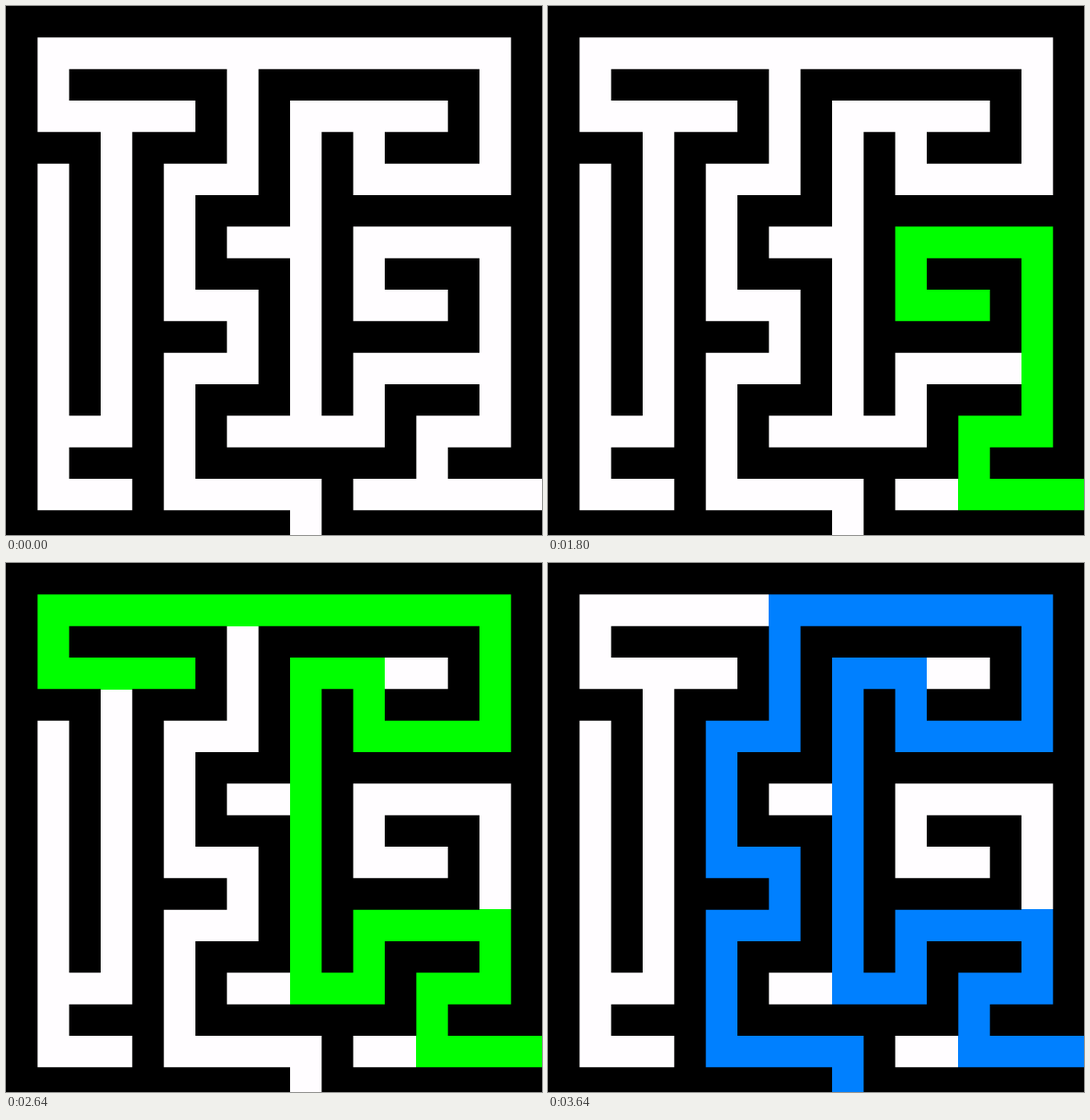
Animation of 600x593 px, one loop 6000 ms. Source, as an HTML page with a canvas:

```html
<!DOCTYPE html>
<html lang="en">
<head>
<meta charset="utf-8">
<title>Maze search</title>
<style>
  html, body { margin: 0; width: 100%; height: 100%; overflow: hidden; background: #000; }
  canvas { display: block; background: #000; }
</style>
</head>
<body>
<canvas id="stage" width="600" height="593"></canvas>
<script>
const ctx = document.getElementById('stage').getContext('2d');
const LOOP = 6000, TICK = 40, BEGIN = 1140, STEP = 52;
const CELL = 106 / 3;
const WHITE = '#fffdff', GREEN = '#00ff00', BLUE = '#0080ff';

// Corridors as turtle moves: capitals go two cells, small letters one,
// brackets enclose side branches.
const MAZE = 'lL(L)URU(UULLDR)LLDL(L)UUU(L)UUR(R)DRRUULLLL' +
  '(LLLDR(R)DDDDDL(DR)UUUU)DDLDDRDLDDRRd';
const MOVES = { L: [-2, 0], R: [2, 0], U: [0, -2], D: [0, 2], l: [-1, 0], d: [0, 1] };

function growMaze(moves) {
  let node = { x: 16, y: 15, dist: 0, kids: [] };
  const nodes = [], stack = [];
  for (const c of moves) {
    if (c === '(') stack.push(node);
    else if (c === ')') node = stack.pop();
    else {
      const [dx, dy] = MOVES[c], parent = node;
      node = {
        x: parent.x + dx, y: parent.y + dy, dist: parent.dist + Math.abs(dx + dy),
        dir: c.toUpperCase(), parent, kids: []
      };
      parent.kids.push(node);
      nodes.push(node);
    }
  }
  return { nodes, exit: node };
}

const { nodes, exit } = growMaze(MAZE);

// The search visits corners, junctions and dead ends, nearest first.
const isStraight = n => n.kids.length === 1 && n.kids[0].dir === n.dir;
const visits = nodes.filter(n => !isStraight(n)).sort((a, b) => a.dist - b.dist);
const goal = visits.indexOf(exit);

// Left, top, right and bottom of the corridor between a node and its parent
const bounds = ({ x, y, parent: p }) => [
  Math.min(x, p.x), Math.min(y, p.y), Math.max(x, p.x) + 1, Math.max(y, p.y) + 1
].map(i => i * CELL);

const corridors = new Path2D();
for (const n of nodes) {
  const [l, t, r, b] = bounds(n);
  corridors.rect(l, t, r - l, b - t);
}

// Covers whole pixels; the corridor mask softens the edges later.
function trace(node, color) {
  ctx.fillStyle = color;
  for (; node.parent; node = node.parent) {
    const [l, t, r, b] = bounds(node);
    const left = Math.floor(l), top = Math.floor(t);
    ctx.fillRect(left, top, Math.ceil(r) - left, Math.ceil(b) - top);
  }
}

function draw(time) {
  const step = Math.floor((time - BEGIN) / STEP);
  ctx.globalCompositeOperation = 'source-over';
  ctx.fillStyle = WHITE;
  ctx.fillRect(0, 0, 600, 593);
  if (step > goal) trace(exit, BLUE);
  else if (step >= 0) trace(visits[step], GREEN);
  ctx.globalCompositeOperation = 'destination-in';
  ctx.fill(corridors);
}

const start = performance.now();
function frame() {
  const time = (performance.now() - start) % LOOP;
  draw(Math.floor(time / TICK) * TICK);
  requestAnimationFrame(frame);
}
frame();
</script>
</body>
</html>
```
